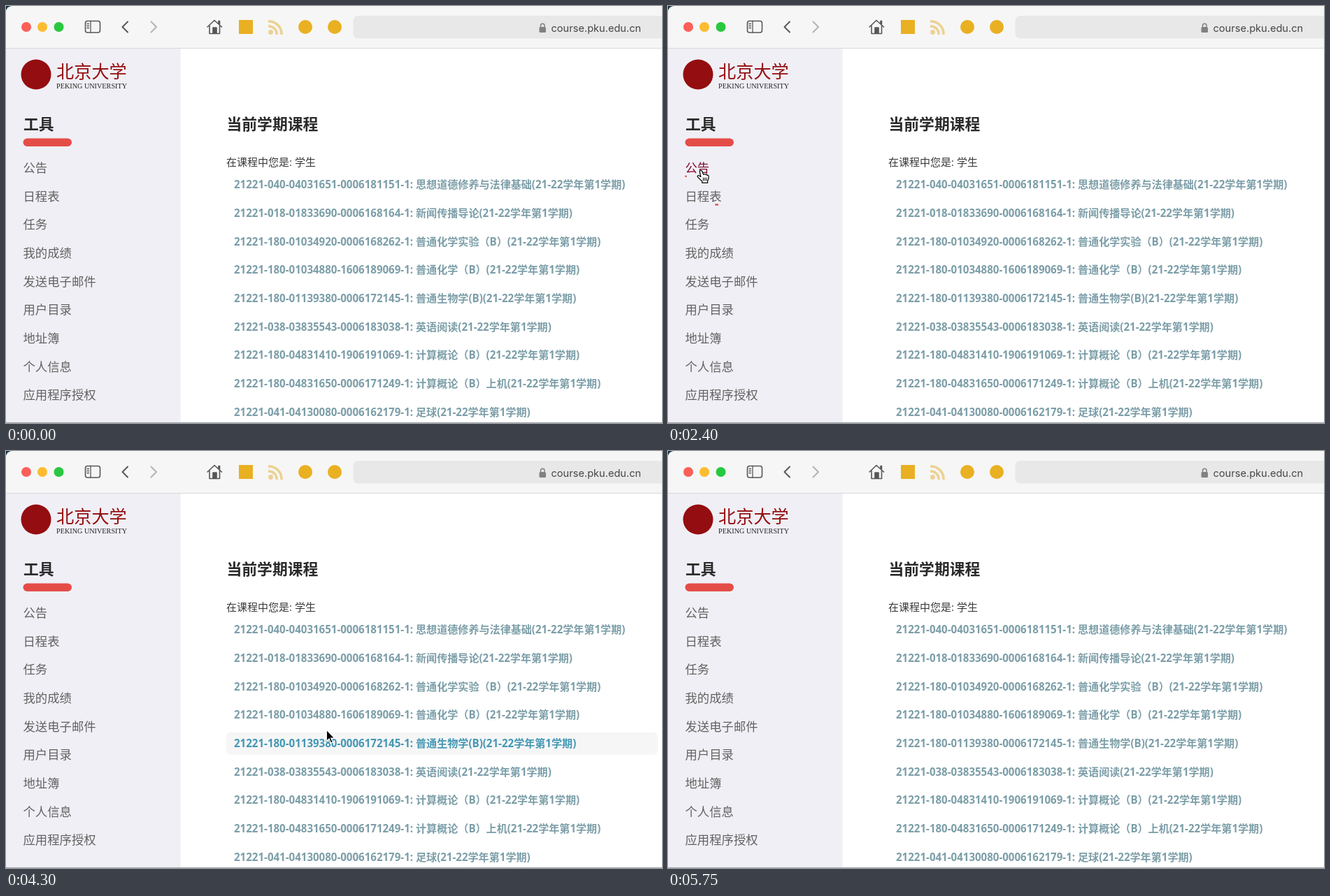
Recreate the animation shown at these times as an HTML page. Size 938 by 597 pixels, loop 5.95 s.

```html
<!DOCTYPE html>
<html lang="zh-CN">
<head>
<meta charset="utf-8">
<title>课程</title>
<style>
html, body { margin: 0; height: 100%; overflow: hidden; background: #fff; }
svg { display: block; width: 938px; height: 597px; font-family: "Open Sans", "Noto Sans CJK SC", "Noto Sans CJK", sans-serif; }
.title { font-weight: 700; font-size: 21.8px; fill: #2a2a2a; }
.menu { font-size: 17.35px; }
.course { font-weight: 700; font-size: 15.08px; }
.line { fill: none; stroke: #575757; stroke-width: 1.6; stroke-linecap: round; stroke-linejoin: round; }
</style>
</head>
<body>
<svg viewBox="0 0 938 597">
  <rect width="938" height="597" fill="#1d3848"/>
  <path d="M0 597V10Q0 0 10 0H938V597Z" fill="#fff"/>
  <path d="M0 60V10Q0 0 10 0H938V60Z" fill="#f6f6f6"/>
  <rect y="60" width="938" height="1" fill="#d8d8d8"/>
  <rect y="61" width="249.5" height="535" fill="#f0eff5"/>
  <rect y="596" width="938" height="1" fill="#9ba3a9"/>

  <circle cx="29" cy="30" r="7" fill="#fb5f58"/>
  <circle cx="52" cy="30" r="7" fill="#fcbc2e"/>
  <circle cx="75.5" cy="30" r="7" fill="#28c840"/>
  <g class="line">
    <rect x="113.5" y="21.5" width="21" height="16.5" rx="3"/>
    <path d="M121 21.5V38M116 25.5h2.5M116 28.5h2.5M116 31.5h2.5" stroke-width="1.3"/>
    <path d="M174 22.5L166.5 30L174 37.5" stroke-width="2"/>
    <path d="M207.5 22.5L215 30L207.5 37.5" stroke="#b4b4b4" stroke-width="2"/>
    <path d="M288 30L298 20.5L308.5 30M291 28V39.5H305.5V28M304 25V21.5H305.5V26"/>
    <rect x="296" y="31" width="5" height="8" fill="#575757"/>
  </g>
  <rect x="333" y="20" width="20" height="20" fill="#e9b022"/>
  <g fill="none" stroke="#ecd193" stroke-width="3.6">
    <path d="M375 29A11 11 0 0 1 387 41M375 22A18 18 0 0 1 394 41"/>
    <circle cx="378.5" cy="37.5" r="1.6"/>
  </g>
  <circle cx="428" cy="30" r="10" fill="#e9b022"/>
  <circle cx="470" cy="30" r="10" fill="#e9b022"/>
  <rect x="496.5" y="14" width="460" height="32.5" rx="7" fill="#e8e8e8"/>
  <rect x="762.5" y="30" width="9.5" height="8" rx="1.5" fill="#818181"/>
  <path d="M764.5 30V27.5A2.8 2.8 0 0 1 770 27.5V30" fill="none" stroke="#818181" stroke-width="1.5"/>
  <text x="779.5" y="36.5" font-size="14.6" fill="#464646" style="font-family: Inter, sans-serif">course.pku.edu.cn</text>

  <circle cx="43" cy="98" r="21.5" fill="#940d10"/>
  <text x="72" y="102.5" font-size="25.2" font-weight="500" fill="#940d10">北京大学</text>
  <text x="72" y="118" font-size="10.2" fill="#222" style="font-family: 'Liberation Serif', serif">PEKING UNIVERSITY</text>
  <text class="title" x="25" y="177">工具</text>
  <rect x="24.5" y="189.5" width="69.5" height="11.5" rx="5.75" fill="#e44d47"/>
  <text class="title" x="315.5" y="177">当前学期课程</text>
  <text x="315" y="229" font-size="15" fill="#3a3a3a">在课程中您是: 学生</text>

  <g id="menu"></g>
  <g id="courses"></g>
  <path id="arrow" d="M0 0V16L3.7 12.6L6.3 18.6L8.9 17.5L6.4 11.7H11.5Z" stroke="#fff" stroke-width="1.2"/>
  <g id="hand" stroke="#000" stroke-width="1.2" stroke-linejoin="round" stroke-linecap="round">
    <path fill="#fff" d="M4.3 2.8C5 .8 7.2 1 8 3L9.6 7.4Q11.5 5.5 12.4 7.6Q14.2 6.3 14.9 8.3Q17 7.8 17.2 10Q17.3 14 15.6 16.2V19.2H7.8V17L1.3 10.6C.6 9.4 2 8 3.6 9L5.9 10.6Z"/>
    <path d="M9.5 12v4M11.7 12v4M13.9 12v4" stroke-width="1"/>
  </g>
</svg>
<script>
const LOOP = 5950, STEP = 50, PITCH = 40.66;
const $ = id => document.getElementById(id);
const menu = '公告 日程表 任务 我的成绩 发送电子邮件 用户目录 地址簿 个人信息 应用程序授权'.split(' ');
const courses = [
  '040-04031651-0006181151-1: 思想道德修养与法律基础',
  '018-01833690-0006168164-1: 新闻传播导论',
  '180-01034920-0006168262-1: 普通化学实验（B）',
  '180-01034880-1606189069-1: 普通化学（B）',
  '180-01139380-0006172145-1: 普通生物学(B)',
  '038-03835543-0006183038-1: 英语阅读',
  '180-04831410-1906191069-1: 计算概论（B）',
  '180-04831650-0006171249-1: 计算概论（B）上机',
  '041-04130080-0006162179-1: 足球'
];
const menuY = i => 231.5 + PITCH * i, courseY = i => 256 + PITCH * i;
const menuW = i => menu[i].length * 17.2;

$('menu').innerHTML = menu.map((s, i) =>
  `<text class="menu" x="24.5" y="${menuY(i) + 6.6}">${s}</text>
   <rect y="${menuY(i) + 11.2}" height="2.2" fill="#e2463f"/>`).join('');
$('courses').innerHTML = courses.map((s, i) =>
  `<rect x="315" y="${courseY(i) - 16}" width="617" height="32" rx="6" fill="#f4f4f5"/>
   <text class="course" x="326" y="${courseY(i) + 5.4}">21221-${s}(21-22学年第1学期)</text>`).join('');

// Pointer path: time, x, y
const path = [
  [950, 148, 484], [1000, 112, 410], [1050, 85, 401], [1300, 67, 394], [1500, 66, 392],
  [1600, 64, 384], [2140, 49, 285], [2240, 48, 260], [2375, 47, 243], [2400, 47, 235],
  [2450, 47, 231], [2520, 47, 244], [2690, 48, 326], [2830, 48, 383], [2985, 48, 407],
  [3110, 47, 447], [3200, 47, 472], [3300, 47, 483], [3450, 76, 478], [3650, 320, 458],
  [3800, 427, 451], [3950, 427, 451], [4080, 429, 465], [4200, 445, 440], [4500, 485, 318],
  [4700, 491, 282], [5100, 505, 253], [5150, 506, 254], [5250, 506, 254], [5300, 509, 249],
  [5400, 509, 249], [5450, 530, 200], [5550, 560, 16]
];

function pointer(t) {
  const k = path.findIndex(p => p[0] >= t);
  if (k < 0 || t < path[0][0]) return null;
  const b = path[k], a = path[k - 1] || b;
  const f = (t - a[0]) / (b[0] - a[0] || 1);
  return { x: a[1] + (b[1] - a[1]) * f, y: a[2] + (b[2] - a[2]) * f };
}

// CSS "ease" curve
function ease(x) {
  if (x <= 0) return 0;
  if (x >= 1) return 1;
  const bez = (u, a, b) => 3 * (1 - u) ** 2 * u * a + 3 * (1 - u) * u * u * b + u ** 3;
  let lo = 0, hi = 1;
  for (let i = 0; i < 20; i++) {
    const mid = (lo + hi) / 2;
    if (bez(mid, .25, .25) < x) lo = mid; else hi = mid;
  }
  return bez(lo, .1, 1);
}

// Index of the hovered entry: menu first, then courses
function hit(p) {
  if (!p) return -1;
  const i = menu.findIndex((s, i) => Math.abs(p.y - menuY(i)) < 12 && p.x > 24 && p.x < 24 + menuW(i));
  if (i >= 0) return i;
  const j = courses.findIndex((s, i) => Math.abs(p.y - courseY(i)) < 16 && p.x > 315 && p.x < 932);
  return j < 0 ? -1 : j + menu.length;
}

const spans = [];
for (let t = 0, last = -1; t < LOOP; t += 5) {
  const now = hit(pointer(t));
  if (now !== last) {
    if (last >= 0) spans[spans.length - 1].end = t;
    if (now >= 0) spans.push({ item: now, start: t });
  }
  last = now;
}

// Hover growth (0..1) and leave progress (0..1) of an entry
function hover(item, t, time) {
  const s = spans.filter(s => s.item === item && s.start <= t).pop();
  if (!s) return { grow: 0, leave: 1 };
  return { grow: ease((Math.min(t, s.end) - s.start) / time), leave: ease((t - s.end) / time), on: t < s.end };
}

function draw(t) {
  menu.forEach((s, i) => {
    const [text, bar] = [...$('menu').children].slice(2 * i);
    const h = hover(i, t, 300), w = menuW(i);
    text.setAttribute('fill', h.on ? '#800a2b' : '#626262');
    bar.setAttribute('x', 24.3 + w * h.leave);
    bar.setAttribute('width', w * h.grow * (1 - h.leave));
  });
  courses.forEach((s, i) => {
    const [back, text] = [...$('courses').children].slice(2 * i);
    const h = hover(i + menu.length, t, 150), v = h.grow * (1 - h.leave);
    back.setAttribute('opacity', v);
    text.style.fill = `color-mix(in srgb, #3795b7 ${v * 100}%, #7c9ea8)`;
  });
  const p = pointer(t), i = hit(p), j = i - menu.length;
  const link = i >= 0 && (j < 0 || (Math.abs(p.y - courseY(j)) < 11 && p.x > 326));
  $('hand').style.display = p && link ? '' : 'none';
  $('arrow').style.display = p && !link ? '' : 'none';
  if (p) {
    $('hand').setAttribute('transform', `translate(${p.x - 6} ${p.y - 1})`);
    $('arrow').setAttribute('transform', `translate(${p.x} ${p.y})`);
  }
}

const begin = performance.now();
function tick() {
  const t = (performance.now() - begin) % LOOP;
  draw(Math.floor(t / STEP) * STEP);
  requestAnimationFrame(tick);
}
tick();
</script>
</body>
</html>
```
